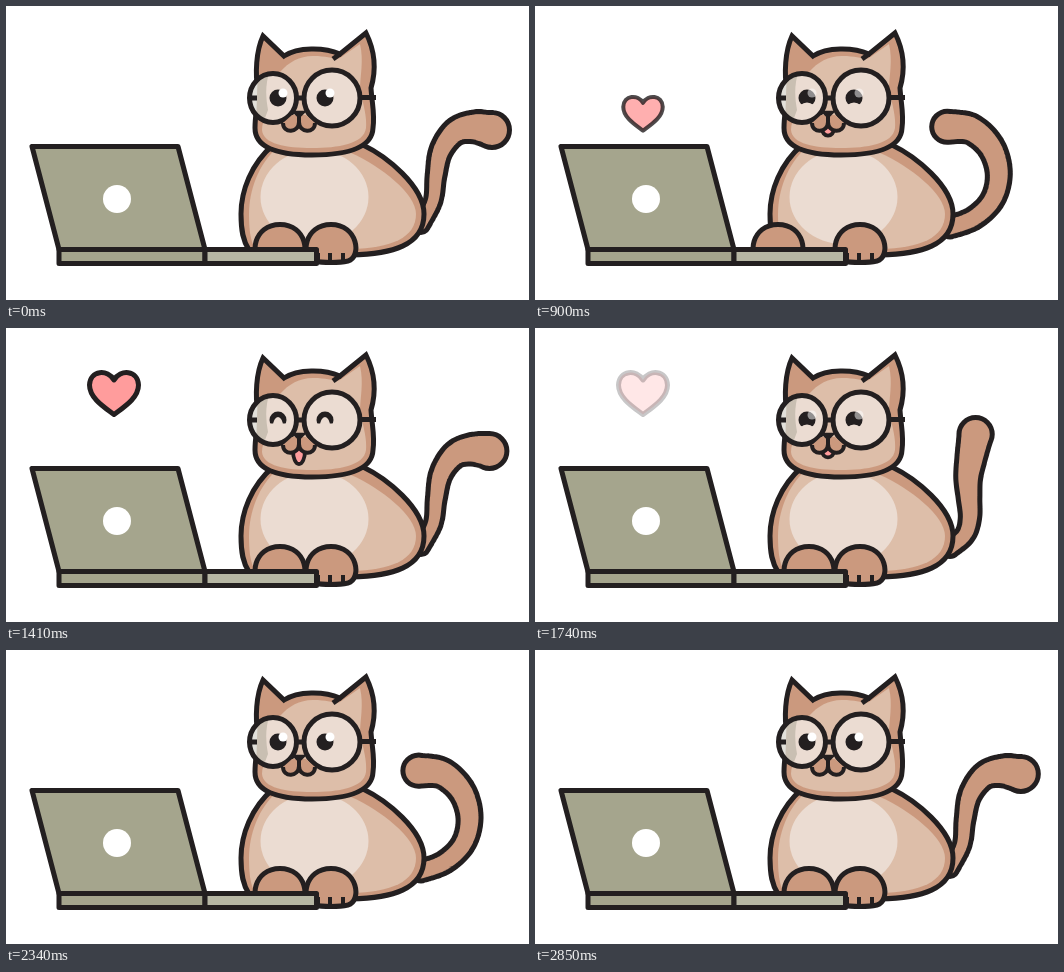
Write an HTML page with a canvas that moves like this. It is 523x294 px and loops after 3600 ms.

```html
<!DOCTYPE html>
<html lang="en">
<head>
<meta charset="utf-8">
<title>Cat at a laptop</title>
<style>
  html, body { margin: 0; width: 100%; height: 100%; overflow: hidden; background: #fff; }
  canvas { display: block; width: 523px; height: 294px; }
</style>
</head>
<body>
<canvas id="stage"></canvas>
<script>
const W = 523, H = 294, LOOP = 3600;
const INK = '#231f20', FUR = '#cb997e', LIGHT = '#ddbea9', PALE = '#ebdcd2';
const canvas = document.getElementById('stage');
const ctx = canvas.getContext('2d');
const dpr = window.devicePixelRatio || 1;
canvas.width = W * dpr;
canvas.height = H * dpr;

// Timelines: [ms, values...]
const TAIL = [[120, 0], [720, 1], [870, 1], [1470, 0], [2070, 1], [2300, 1], [2865, 0]];
const PAW = [[120, 274, 216], [450, 270, 174], [540, 267, 176], [735, 243, 216], [910, 243, 216], [1200, 274, 216]];
const SMILE = [[720, 0], [1080, 1], [1560, 1], [1920, 0]];
const HEART = [[720, 130, 0.7], [1170, 65, 1]];
const GLOW = [[720, 0], [945, 1], [1560, 1], [1800, 0]];

// Tail centre lines from right to left: [swing, points]
const POSES = [
  [0, [415, 219, 427, 195, 430, 170, 435, 145, 449, 126, 467, 121, 486, 124]],
  [0.43, [415, 220, 430, 207, 435, 190, 434, 170, 433, 150, 436, 128, 440, 106]],
  [0.74, [415, 221, 435, 212, 449, 195, 454, 172, 450, 148, 438, 127, 420, 115]],
  [1, [415, 221, 439, 212, 458, 193, 464, 167, 456, 141, 436, 123, 412, 121]]
];

const mix = (a, b, k) => a + (b - a) * k;
const sine = k => (1 - Math.cos(Math.PI * k)) / 2;
const linear = k => k;

function at(keys, t, ease = sine) {
  if (t <= keys[0][0]) return keys[0].slice(1);
  for (let i = 1; i < keys.length; i++) {
    const a = keys[i - 1], b = keys[i];
    if (t < b[0]) {
      const k = ease((t - a[0]) / (b[0] - a[0]));
      return a.slice(1).map((v, j) => mix(v, b[j + 1], k));
    }
  }
  return keys[keys.length - 1].slice(1);
}

function shape(path, fill, line = 5) {
  const p = typeof path === 'string' ? new Path2D(path) : path;
  if (fill) { ctx.fillStyle = fill; ctx.fill(p); }
  if (line) { ctx.lineWidth = line; ctx.strokeStyle = INK; ctx.stroke(p); }
}

function oval(x, y, rx, ry = rx) {
  const p = new Path2D();
  p.ellipse(x, y, rx, ry, 0, 0, Math.PI * 2);
  return p;
}

function spline(p0, p1, p2, p3, u) {
  return 0.5 * (2 * p1 + (p2 - p0) * u + (2 * p0 - 5 * p1 + 4 * p2 - p3) * u * u
    + (3 * p1 - p0 - 3 * p2 + p3) * u * u * u);
}

function drawTail(swing) {
  let i = 1;
  while (i < POSES.length - 1 && swing > POSES[i][0]) i++;
  const [a, from] = POSES[i - 1], [b, to] = POSES[i];
  const pts = from.map((v, j) => mix(v, to[j], (swing - a) / (b - a)));
  const coord = (n, axis) => pts[2 * Math.max(0, Math.min(6, n)) + axis];
  const root = 7.5 + 2.5 * swing, tip = 17.5 - 2 * swing;
  for (const [edge, color] of [[2.5, INK], [-2.5, FUR]]) {
    const body = new Path2D();
    for (let n = 0; n <= 120; n++) {
      const s = n / 120, seg = Math.min(5, Math.floor(s * 6)), u = s * 6 - seg;
      const [x, y] = [0, 1].map(axis => spline(coord(seg - 1, axis), coord(seg, axis),
        coord(seg + 1, axis), coord(seg + 2, axis), u));
      const r = mix(root, tip, s ** 1.8) + edge;
      body.moveTo(x + r, y);
      body.arc(x, y, r, 0, Math.PI * 2);
    }
    shape(body, color, 0);
  }
}

function drawBody() {
  const outline = 'M267 139C245 158 235 185 235 208C235 225 237 235 243 244L345 249C385 248 418 240 418 208C418 180 380 150 357 139Z';
  shape(outline, FUR, 0);
  shape('M272 141C252 158 243 185 243 208C243 230 246 238 250 244L345 243C385 242 410 232 410 208C410 188 375 160 345 147Z', LIGHT, 0);
  shape(oval(308.5, 191, 54, 47), PALE, 0);
  shape(outline);
}

function drawEye(x, smile) {
  shape(oval(x, 92, 8.5), INK, 0);
  ctx.globalAlpha = 1 - smile;
  shape(oval(x + 5, 87, 4.5), '#fff', 0);
  ctx.globalAlpha = 1;
  if (!smile) return;
  const top = 101 - 12 * smile ** 1.4, rx = mix(13, 5, smile);
  const lid = oval(x, top + 9, rx, 9);
  lid.rect(x - 10, mix(101, 95.5, smile), 20, 8);
  shape(lid, PALE, 0);
}

function drawLenses() {
  const left = oval(267, 92, 23.5, 24.5), right = oval(326, 92, 28);
  shape(left, PALE, 0);
  ctx.save();
  ctx.clip(left);
  shape('M240 60H252V125H240Z', '#e2e0da', 0);
  shape('M252 60H266Q257 78 262 104L256 120H250Z', '#c9bfb2', 0);
  ctx.restore();
  shape(right, PALE, 0);
  return [left, right];
}

function drawHead(smile) {
  const outline = 'M278 50C292 41 318 41 334 48L360 27C369 45 370 65 365 82C366 98 369 108 367 122C366 144 335 149 306 149C275 149 249 143 249 122C249 108 252 98 252 84C249 68 250 45 257 30Z';
  shape(outline, FUR, 0);
  shape('M264 100C260 75 282 49 308 50C322 50 330 54 334 52L354 38C358 55 354 70 354 84C358 100 361 112 360 122C358 138 332 142 306 142C280 142 257 138 256 124C256 112 264 106 264 100Z', LIGHT, 0);
  shape(outline);
  shape('M334 48L327 53');

  const lenses = drawLenses();
  drawEye(272, smile);
  drawEye(319, smile);
  for (const lens of lenses) shape(lens);
  shape('M291 92H298M244 92H251M355 91.5H370');

  if (smile) shape(oval(293, 123, 6, 13 * smile), '#ff9c9c', 3.8);
  shape('M277 117C277 128 293 127 293 116C293 127 309 128 309 117L300 109H286Z', FUR, 0);
  shape('M277 117C277 128 293 127 293 116C293 127 309 128 309 117M293 110V117', null, 4);
  shape('M288 106H298L293 111Z', INK, 2.5);
}

function drawPaw(x, y) {
  ctx.save();
  ctx.translate(x, y);
  shape('M-17 39C-31 35 -27 2.5 0 2.5C27 2.5 31 35 17 39C8 41 -8 41 -17 39Z', FUR);
  shape('M-13 31V39M-1 31V40M12 31V39', null, 4);
  ctx.restore();
}

function drawLaptop() {
  shape('M53 243.5H199V257.5H53Z', '#a5a58d');
  shape('M199 243.5H310.5V257.5H199Z', '#b7b7a4');
  shape('M26 140.5H172L199 243.5H53Z', '#a5a58d');
  shape(oval(111, 193, 14), '#fff', 0);
}

function drawHeart(t) {
  const [alpha] = at(GLOW, t, linear);
  if (!alpha) return;
  const [y, size] = at(HEART, t);
  ctx.save();
  ctx.globalAlpha = alpha;
  ctx.translate(108, y);
  ctx.scale(size, size);
  shape('M0 -13C-6 -24 -24 -23 -24.5 -8C-24.5 5 -10 14 0 21.5C10 14 24.5 5 24.5 -8C24 -23 6 -24 0 -13Z', '#ff9c9c');
  ctx.restore();
}

function draw(t) {
  ctx.setTransform(dpr, 0, 0, dpr, 0, 0);
  ctx.fillStyle = '#fff';
  ctx.fillRect(0, 0, W, H);
  ctx.lineJoin = 'miter';
  drawTail(at(TAIL, t)[0]);
  drawBody();
  drawHead(at(SMILE, t)[0]);
  drawPaw(...at(PAW, t));
  drawPaw(325, 216);
  ctx.lineJoin = 'round';
  drawLaptop();
  drawHeart(t);
}

const start = performance.now();
function tick() {
  draw((performance.now() - start) % LOOP);
  requestAnimationFrame(tick);
}
tick();
</script>
</body>
</html>
```
